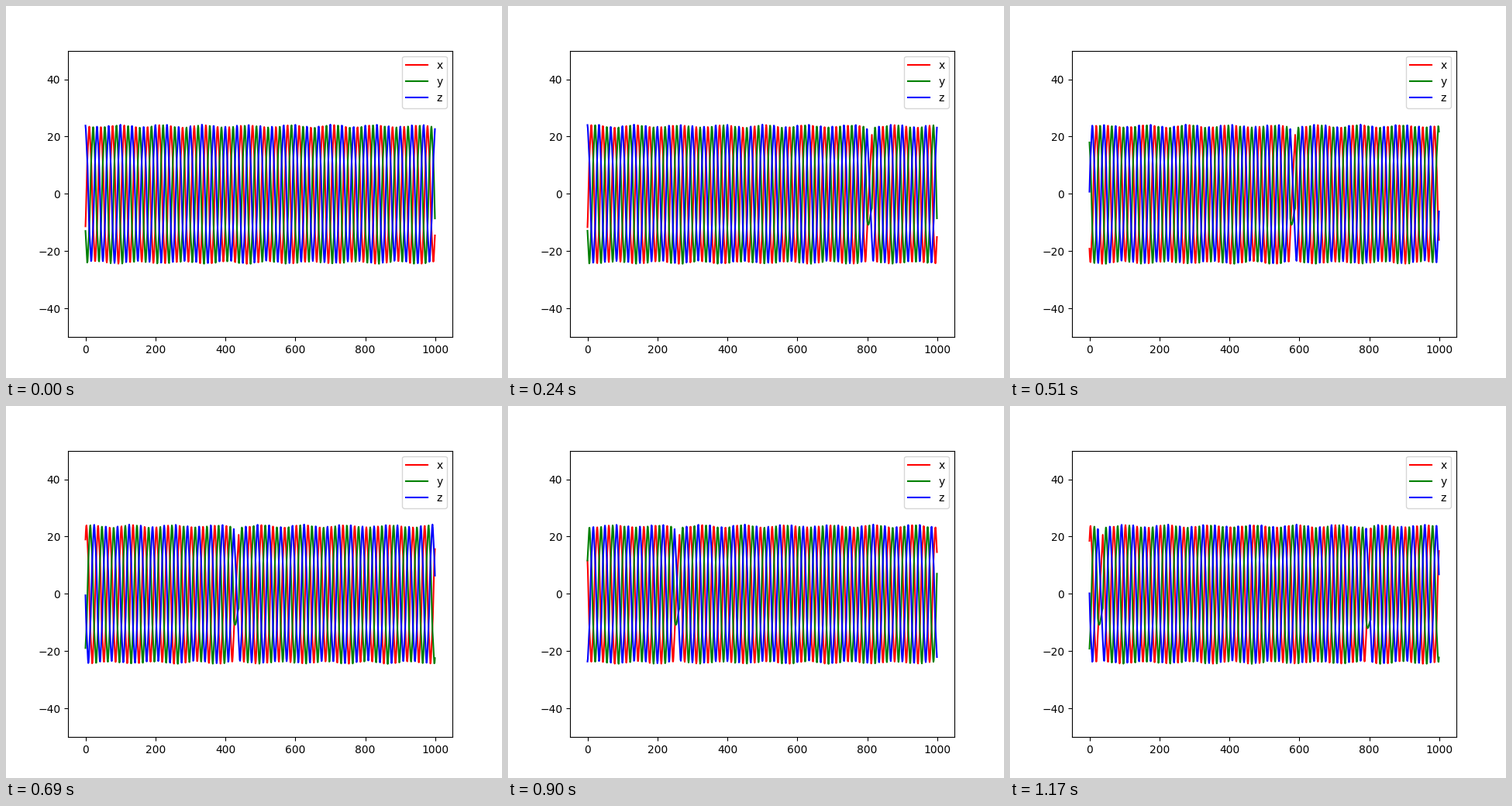
These frames come from a looping animation (640x480 px, 1.2 s). A matplotlib script:

```python
import numpy as np
import matplotlib.pyplot as plt
from matplotlib.animation import FuncAnimation

FRAMES = 40
INTERVAL = 30
WINDOW = 1000
STEP = 25                       # samples scrolled per frame
FREQ = (30 - 3.5 / 360) / 1000  # cycles per sample
START = np.radians(3)
GAPS = [(999, 1013), (1766, 1779)]

# name, colour, phase shift in degrees, offset
CHANNELS = [("x", "red", -120, -0.2),
            ("y", "green", 120, -0.25),
            ("z", "blue", 0, 0.0)]


def wave(n, shift, offset):
    """Sine with a fifth harmonic and a slow swell in amplitude."""
    angle = 2 * np.pi * FREQ * n + START + np.radians(shift)
    swell = 1 + 0.016 * np.cos(2 * np.pi * (n - 95) / 122.5)
    return swell * (22.7 * np.cos(angle) + 1.15 * np.cos(5 * angle)) + offset


def bridge(signal, a, b):
    """Replace the samples between a and b by a lazy transition."""
    s = np.linspace(0, 1, b - a + 1)
    slope = signal[a] - signal[a - 1]
    bend = 0.35 * slope * (b - a) * s * (1 - s) ** 2
    signal[a:b + 1] = signal[a] + (signal[b] - signal[a]) * s + bend


samples = np.arange(WINDOW + STEP * FRAMES)
ticks = np.arange(WINDOW)

fig, ax = plt.subplots(figsize=(6.4, 4.8), dpi=100)
signals, lines = [], []
for name, color, shift, offset in CHANNELS:
    signal = wave(samples, shift, offset)
    for a, b in GAPS:
        bridge(signal, a, b)
    signals.append(signal)
    lines += ax.plot(ticks, signal[:WINDOW], color=color, label=name)
ax.set_ylim(-50, 50)
ax.legend(loc="upper right")


def update(frame):
    first = frame * STEP
    for line, signal in zip(lines, signals):
        line.set_ydata(signal[first:first + WINDOW])
    return lines


anim = FuncAnimation(fig, update, frames=FRAMES, interval=INTERVAL,
                     repeat=True, repeat_delay=0)
plt.show()
```
